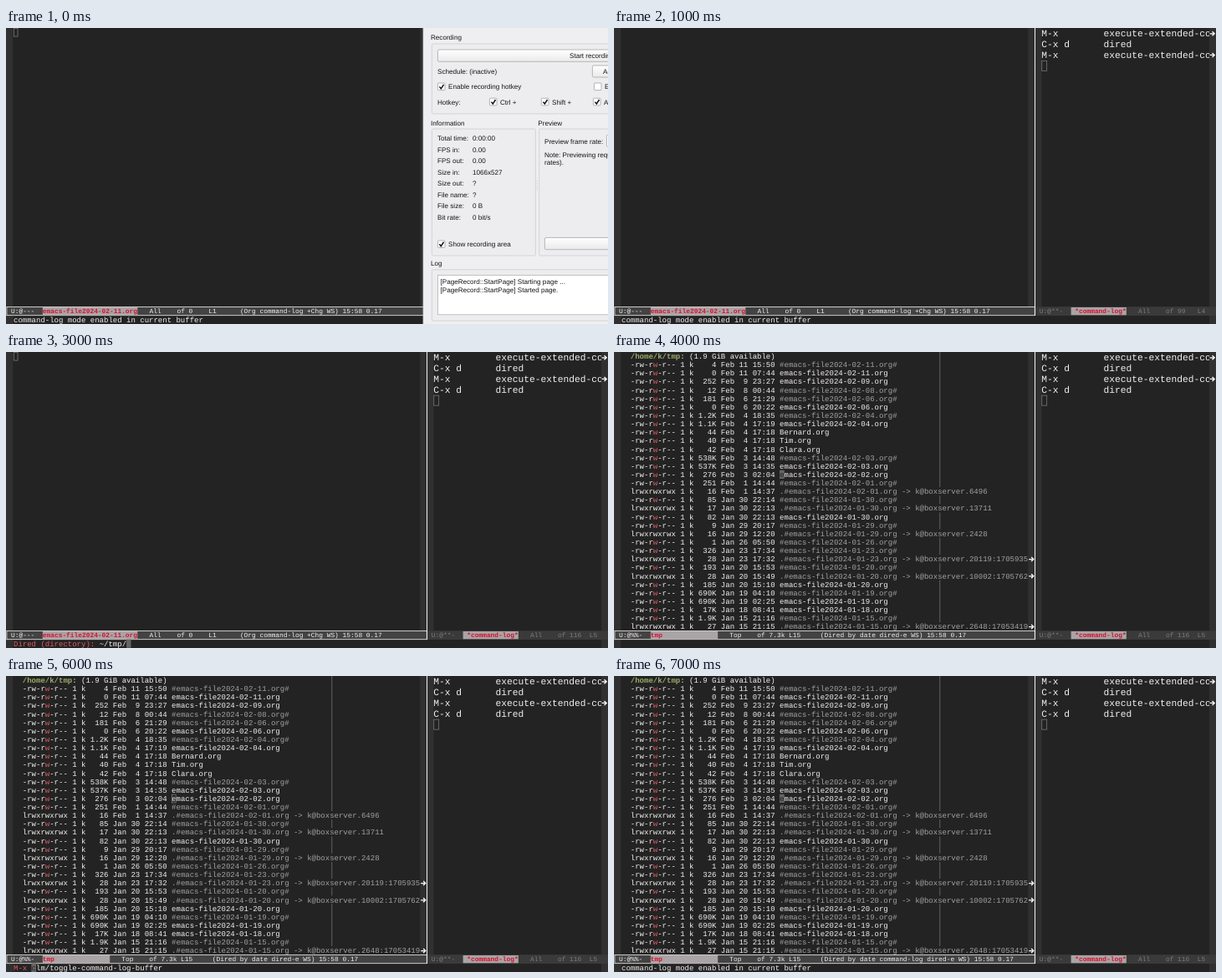
Recreate the animation shown at these times as an HTML page. Size 720 by 355 pixels, loop 8000 ms.

```html
<!DOCTYPE html>
<html lang="en">
<head>
<meta charset="utf-8">
<title>Command log</title>
<style>
html, body { margin: 0; width: 100%; height: 100%; overflow: hidden; background: #242324; }
svg { display: block; width: 720px; height: 355px; }
text { white-space: pre; text-rendering: geometricPrecision; }
.mono { font-family: "Liberation Mono", monospace; }
.sans { font-family: "Liberation Sans", sans-serif; }
</style>
</head>
<body>
<svg id="stage" viewBox="0 0 720 355" xmlns="http://www.w3.org/2000/svg">
  <defs>
    <clipPath id="clipLeft"><rect x="0" y="0" width="495.3" height="334"/></clipPath>
    <clipPath id="clipLog"><rect x="504" y="0" width="208" height="334"/></clipPath>
    <linearGradient id="btn" x1="0" y1="0" x2="0" y2="1">
      <stop offset="0" stop-color="#fff"/><stop offset="1" stop-color="#ebeaeb"/>
    </linearGradient>
  </defs>
</svg>
<script>
const NS = "http://www.w3.org/2000/svg";
const stage = document.getElementById("stage");
const FG = "#f3f1ee", BG = "#242324", DIM = "#a3a1a2", RED = "#df5c62", CUR = "#656565";
const PX = 0.6754;                       // screen scale
const CW = 8 * PX, LH = 15 * PX;         // editor cell
const LW = 10 * PX, LLH = 19 * PX;       // log cell
const MW = 7 * PX;                       // mode line cell
const X0 = 9, LX = 511.3, MINI = 344.6;

function el(parent, tag, attrs, txt) {
  const e = document.createElementNS(NS, tag);
  for (const k in attrs) e.setAttribute(k, attrs[k]);
  if (txt !== undefined) e.textContent = txt.replace(/ /g, "\u00a0");
  parent.appendChild(e);
  return e;
}
const group = (parent = stage, attrs = {}) => el(parent, "g", attrs);
const rect = (g, x, y, w, h, fill, more) => el(g, "rect", { x, y, width: w, height: h, fill, ...more });
const frame = (g, x, y, w, h, stroke, fill = "none", more) =>
  rect(g, x, y, w, h, fill, { stroke, "stroke-width": 0.8, ...more });

function mono(g, x, y, s, fill, cell = CW, bold) {
  const a = { class: "mono", x, y, fill, "font-size": cell / 0.6001 };
  if (bold) a["font-weight"] = "bold";
  return el(g, "text", a, s);
}

// Coloured runs placed on the character grid
function runs(g, col, y, list) {
  for (const [s, fill, bold] of list) {
    mono(g, X0 + col * CW, y, s, fill, CW, bold);
    col += s.length;
  }
}
const base = row => 8.1 + row * LH;

function cursor(g, col, top, solid, ch = "") {
  const x = X0 + col * CW;
  if (solid) {
    rect(g, x, top, CW, LH, CUR);
    if (ch) mono(g, x, top + 8.1, ch, BG);
  } else frame(g, x + 0.35, top + 0.35, CW - 0.7, LH - 0.4, "#777");
}

function arrow(g, x, y) {
  el(g, "path", {
    d: `M${x} ${y}h4.2M${x + 2.9} ${y - 2.5}l2.7 2.5l-2.7 2.5`,
    fill: "none", stroke: "#fff", "stroke-width": 1.3
  });
}

// Backdrop
rect(stage, 0, 0, 720, 355, BG);
for (const x of [0, 495.3]) rect(stage, x, 0, 8.3, 334, "#303030");
for (const x of [503.5, 712]) rect(stage, x, 0, 8, 334, "#303030");
rect(stage, 0, MINI, 8.3, 11, "#303030");
rect(stage, 712, MINI, 8, 11, "#303030");

// Mode lines
const MY = 342;
rect(stage, 504, 334.2, 216, 10.8, "#3b3a3b");
frame(stage, 0.9, 334.5, 502.4, 10.2, "#f3f1ee", "#444344");
rect(stage, 503, 0, 1, 345, "#f3f1ee");

function modeLine(x, head, name, width, tail, fg) {
  const g = group();
  mono(g, x, MY, head, fg, MW);
  const bx = x + 8 * MW;
  rect(g, bx, 335, width * MW, 9.3, "#aaa4a6");
  mono(g, bx, MY, name, "#d8102f", MW, true);
  mono(g, bx + width * MW, MY, tail, fg, MW);
  return g;
}
const modeOrg = modeLine(6, "U:@---", "emacs-file2024-02-11.org", 24,
  "   All    of 0    L1      (Org command-log +Chg WS) 15:58 0.17", FG);
const dirMode = extra => modeLine(6, "U:@%%-", "tmp", 17,
  `   Top    of 7.3k L15     (Dired by date ${extra}dired-e WS) 15:58 0.17`, FG);
const modeDir = dirMode(""), modeDirLog = dirMode("command-log ");
const logMode = pos => modeLine(508.8, "U:@**-", " *command-log*", 14, "   All    of " + pos, "#7f7c79");
const modeLog1 = logMode("99   L4"), modeLog2 = logMode("116  L5");

// Command log
function commandLog(n) {
  const g = group(), body = group(g, { "clip-path": "url(#clipLog)" });
  for (let i = 0; i < n; i++) {
    const y = 10.4 + i * LLH, ext = i % 2 === 0;
    mono(body, LX, y, ext ? "M-x" : "C-x d", FG, LW);
    mono(body, LX + 11 * LW, y, ext ? "execute-extended-command" : "dired", FG, LW);
    if (ext) arrow(g, 712.6, y - 3.6);
  }
  frame(g, LX + 0.4, n * LLH + 0.8, LW - 0.8, LLH - 0.8, "#777");
  return g;
}
const log1 = commandLog(3), log2 = commandLog(4);

// Directory listing
const HOST = " -> k@boxserver.";
const files = `4 Feb 11 15:50 #02-11
0 Feb 11 07:44 02-11
252 Feb  9 23:27 02-09
12 Feb  8 00:44 #02-08
181 Feb  6 21:29 #02-06
0 Feb  6 20:22 02-06
1.2K Feb  4 18:35 #02-04
1.1K Feb  4 17:19 02-04
44 Feb  4 17:18 Bernard.org
40 Feb  4 17:18 Tim.org
42 Feb  4 17:18 Clara.org
538K Feb  3 14:48 #02-03
537K Feb  3 14:35 02-03
276 Feb  3 02:04 02-02
251 Feb  1 14:44 #02-01
16 Feb  1 14:37 .#02-01 6496
85 Jan 30 22:14 #01-30
17 Jan 30 22:13 .#01-30 13711
82 Jan 30 22:13 01-30
9 Jan 29 20:17 #01-29
16 Jan 29 12:20 .#01-29 2428
1 Jan 26 05:50 #01-26
326 Jan 23 17:34 #01-23
28 Jan 23 17:32 .#01-23 20119:1705935
193 Jan 20 15:53 #01-20
28 Jan 20 15:49 .#01-20 10002:1705762
185 Jan 20 15:10 01-20
690K Jan 19 04:10 #01-19
690K Jan 19 02:25 01-19
17K Jan 18 08:41 01-18
1.9K Jan 15 21:16 #01-15
27 Jan 15 21:15 .#01-15 2648:17053419`.split("\n");

const listing = group();
const rows = group(listing, { "clip-path": "url(#clipLeft)" });
const ruler = row => rect(rows, 389.4, row * LH, 0.8, LH, "#737173");
runs(rows, 2, base(0), [["/home/k/tmp", "#9bae68", true], [": (1.9 GiB available)", FG]]);
ruler(0);
files.forEach((line, i) => {
  const row = i + 1, y = base(row);
  const [, size, date, mark, name, pid] = line.match(/^(\S+) (.{12}) (\.?#?)(\S+) ?(.*)$/);
  const link = mark === ".#";
  const file = /^\d/.test(name) ? `emacs-file2024-${name}.org` : name;
  const end = link ? HOST + pid : mark;
  const info = ` 1 k${size.padStart(5)} ${date} `;
  const mode = link ? [["lrwxrwxrwx", FG]] : [["-rw-r", FG], ["w", RED], ["-r--", FG]];
  runs(rows, 2, y, [...mode, [info, FG], [mark + file + end, mark ? DIM : FG]]);
  if (!link) ruler(row);
  if (pid.length > 6) arrow(listing, 496.2, y - 2.7);
});

// Cursors in the main window
function cursorAt(col, row, solid, ch) {
  const g = group();
  cursor(g, col, row * LH, solid, ch);
  return g;
}
const orgHollow = cursorAt(0, 0, false), orgSolid = cursorAt(0, 0, true);
const dirHollow = cursorAt(35, 14, false), dirSolid = cursorAt(35, 14, true, "e");

// Echo area
function echo(prompt, text, cur) {
  const g = group();
  runs(g, 0, MINI + 8.1, [[prompt, RED], [text, FG]]);
  if (cur !== undefined) cursor(g, cur, MINI, true, text[cur - prompt.length]);
  return g;
}
const echoOn = echo("", "command-log mode enabled in current buffer");
const echoDired = echo("Dired (directory): ", "~/tmp/", 25);
const echoMx = echo("M-x ", "", 4);
const echoToggle = echo("M-x ", "clm/toggle-command-log-buffer", 4);

// Recorder window
const panel = group();
const INK = "#161616", EDGE = "#cfcdcf";
const label = (x, mid, s) =>
  el(panel, "text", { class: "sans", x, y: mid + 2.9, fill: INK, "font-size": 8.1 }, s);
const button = (x, y, h) => frame(panel, x, y, 240, h, "#a9a7a9", "url(#btn)", { rx: 1.6 });
function check(x, mid, on, s, tx = x + 13) {
  frame(panel, x + 0.4, mid - 4.4, 8.6, 8.6, "#a3a1a3", "#fff", { rx: 1 });
  if (on) el(panel, "path", {
    d: `M${x + 2.4} ${mid}l1.9 2.4l3.2 -5`, fill: "none", stroke: "#111", "stroke-width": 1.5
  });
  label(tx, mid, s);
}
const box = (title, x, mid, w, h) => {
  label(x - 1, mid, title);
  frame(panel, x + 0.4, mid + 7.4, w, h, EDGE, "#edecee", { rx: 1.5 });
};

rect(panel, 499, 0, 221, 355, "#efeef0");
rect(panel, 498.6, 0, 0.7, 355, "#c4c2c4");
box("Recording", 509, 11.5, 240, 84);
button(516.4, 26, 14.3);
label(674, 33.2, "Start recording");
label(516, 52, "Schedule: (inactive)");
button(701.4, 45, 14);
label(714, 52, "Add");
check(516, 70.4, true, "Enable recording hotkey");
check(703, 70.4, false, "Enable");
label(516, 88.6, "Hotkey:");
check(578, 88.6, true, "Ctrl +");
check(640, 88.6, true, "Shift +");
check(702, 88.6, true, "Alt");

box("Information", 509, 113.6, 124, 152);
[["Total time:", "0:00:00"], ["FPS in:", "0.00"], ["FPS out:", "0.00"], ["Size in:", "1066x527"],
 ["Size out:", "?"], ["File name:", "?"], ["File size:", "0 B"], ["Bit rate:", "0 bit/s"]]
  .forEach(([k, v], i) => {
    label(516, 132.2 + i * 13.5, k);
    label(558, 132.2 + i * 13.5, v);
  });
check(516, 259.3, true, "Show recording area");
for (let i = 0; i < 5; i++) rect(panel, 634.8, 183 + i * 2.7, 0.8, 0.9, "#b5b3b5");

box("Preview", 637.3, 113.6, 120, 152);
label(644, 135.6, "Preview frame rate:");
frame(panel, 718.4, 128.4, 30, 14, "#a9a7a9", "#fff", { rx: 1.5 });
label(644, 152, "Note: Previewing requires");
label(644, 161.2, "rates).");
button(644.4, 251.4, 14.3);

box("Log", 509, 282.4, 240, 61.4);
frame(panel, 516.4, 296.4, 240, 47.4, "#b5b3b5", "#fff");
label(519.5, 304.3, "[PageRecord::StartPage] Starting page ...");
label(519.5, 313.7, "[PageRecord::StartPage] Started page.");

// One scene per second; the last one starts at 7 s
const org = [modeOrg, modeLog1, log1, echoOn];
const dir = [listing, modeLog2, log2];
const scenes = [
  [...org, orgHollow, panel],
  org,
  [...org, orgSolid],
  [modeOrg, modeLog2, log2, orgHollow, echoDired],
  [...dir, modeDir, dirSolid],
  [...dir, modeDir, dirHollow, echoMx],
  [...dir, modeDir, dirHollow, echoToggle],
  [...dir, modeDirLog, dirSolid, echoOn]
];
const parts = new Set(scenes.flat());

// Blank the cell under a solid cursor's letter
for (const [g, x, y] of [[dirSolid, X0 + 35 * CW, 14 * LH], [echoToggle, X0 + 4 * CW, MINI]]) {
  rect(g, x, y, CW, LH, CUR);
  mono(g, x, y + 8.1, g === dirSolid ? "e" : "c", BG);
}

let shown = -1;
function draw(ms) {
  const i = Math.floor((ms % 8000) / 1000);
  if (i === shown) return;
  shown = i;
  for (const p of parts) p.style.display = scenes[i].includes(p) ? "" : "none";
}
const start = performance.now();
function tick() {
  draw(performance.now() - start);
  requestAnimationFrame(tick);
}
draw(0);
requestAnimationFrame(tick);
</script>
</body>
</html>
```
